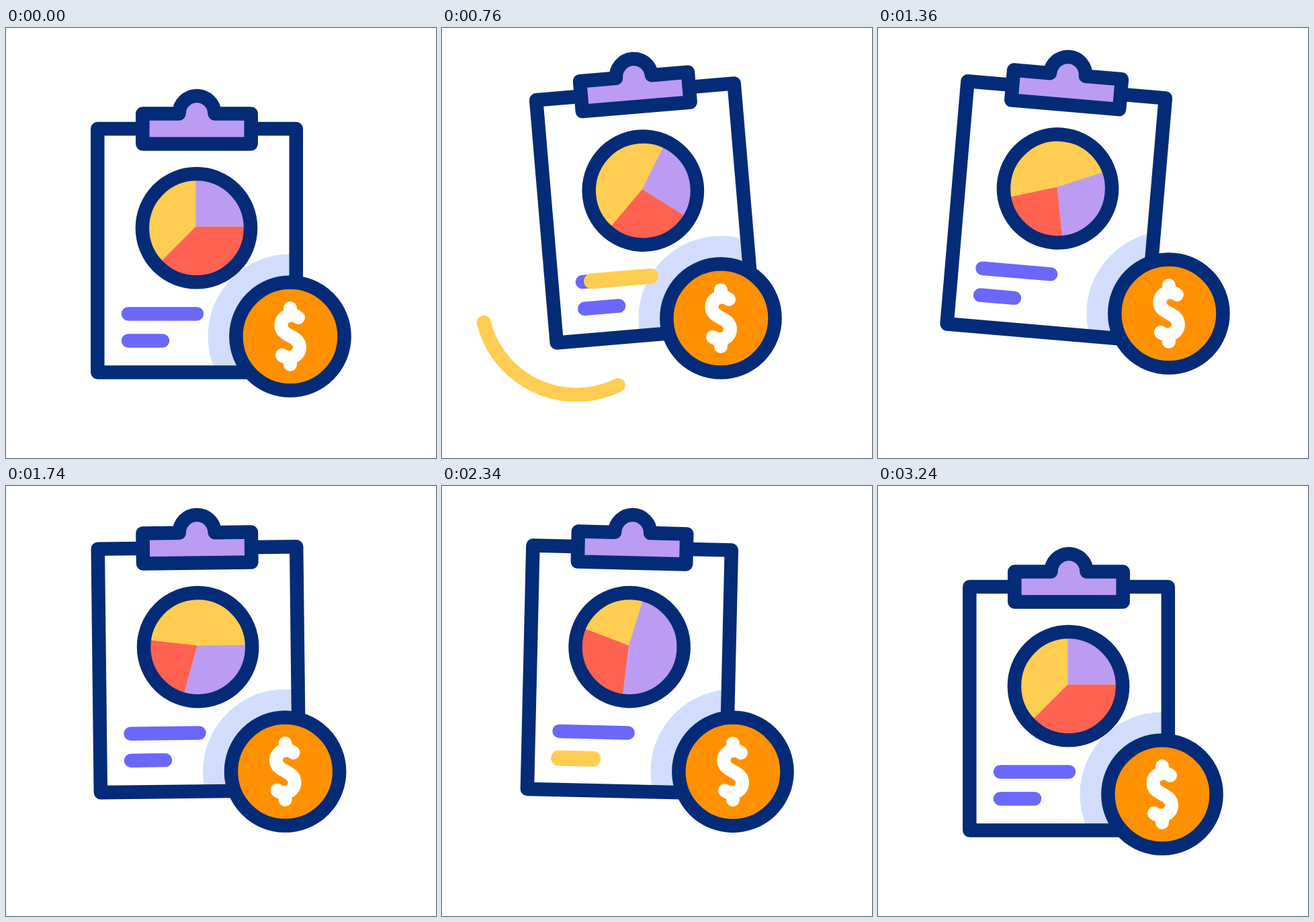
Write an HTML page with a canvas that moves like this. It is 640 px wide and 640 px high and loops after 3.6 s.

```html
<!DOCTYPE html>
<html lang="en">
<head>
<meta charset="utf-8">
<title>Report and coin</title>
<style>
  html, body { margin: 0; width: 100%; height: 100%; overflow: hidden; background: #fff; }
  canvas { display: block; width: 100vmin; height: 100vmin; }
</style>
</head>
<body>
<canvas id="stage" width="640" height="640"></canvas>
<script>
const ctx = document.getElementById('stage').getContext('2d');
const LOOP = 3600, LINE = 20.5, PIVOT = { x: 284, y: 110 };
const NAVY = '#032b78', PURPLE = '#bc9bf3', RED = '#ff6251', YELLOW = '#ffcd52';
const BAR = '#6b67fb', SHADE = '#d2ddfe', ORANGE = '#ff9100', WHITE = '#fff';

const linear = p => p;
const smooth = p => (1 - Math.cos(Math.PI * p)) / 2;
const rad = deg => deg * Math.PI / 180;

// Keys are [time, value] pairs.
function track(keys, ease = smooth) {
  return t => {
    if (t <= keys[0][0]) return keys[0][1];
    for (let i = 1; i < keys.length; i++) {
      const [t0, v0] = keys[i - 1], [t1, v1] = keys[i];
      if (t < t1) return v0 + (v1 - v0) * ease((t - t0) / (t1 - t0));
    }
    return keys[keys.length - 1][1];
  };
}

const boardTilt = track([[240, 0], [830, -5], [1400, 5], [2030, -5], [2560, 5], [3110, 0]]);
const boardLift = track([[240, 0], [850, -58], [2530, -58], [3090, 0]]);
const coinX = track([[363, 0], [926, -10], [1385, 10], [1850, -10], [2320, 10], [2790, 0]]);
const coinY = track([[363, 0], [930, -34], [2318, -34], [2888, 0]]);

// Clockwise slice borders, in degrees from the top.
const purpleFrom = track([[240, 0], [1740, 90], [2550, -10], [3240, 0]], linear);
const redFrom = track([[240, 90], [1740, 196], [2550, 182], [3240, 90]], linear);
const yellowFrom = track([[915, 225], [1740, 277], [2550, 294], [3240, 225]], linear);

const sweep = (h0, h1, t0, t1) => ({
  head: track([[h0, 0], [h1, 1]]),
  tail: track([[t0, 0], [t1, 1]])
});
const swoosh = sweep(420, 760, 770, 1100);
const longGlint = sweep(400, 700, 680, 1020);
const shortGlint = sweep(2040, 2310, 2360, 2640);

function stroke(color, width = LINE) {
  ctx.strokeStyle = color;
  ctx.lineWidth = width;
  ctx.stroke();
}

function fill(color) {
  ctx.fillStyle = color;
  ctx.fill();
}

function disc(x, y, r) {
  ctx.beginPath();
  ctx.arc(x, y, r, 0, 2 * Math.PI);
}

function bar(x0, x1, y, color, width) {
  ctx.beginPath();
  ctx.moveTo(x0, y);
  ctx.lineTo(x1, y);
  stroke(color, width);
}

function glint(x0, x1, y, part, t) {
  const a = part.tail(t), b = part.head(t);
  if (b > a) bar(x0 + (x1 - x0) * a, x0 + (x1 - x0) * b, y, YELLOW, 23);
}

function slice(from, to, color) {
  ctx.beginPath();
  ctx.moveTo(282.5, 295.5);
  ctx.arc(282.5, 295.5, 90, rad(from - 90), rad(to - 90));
  ctx.closePath();
  fill(color);
}

function drawPie(t) {
  const a = purpleFrom(t), b = redFrom(t), c = yellowFrom(t);
  ctx.save();
  disc(283.5, 297.7, 80.6);
  ctx.clip();
  ctx.fillStyle = YELLOW;
  ctx.fillRect(190, 200, 190, 190);
  slice(b, c, RED);
  slice(a, b, PURPLE);
  ctx.restore();
  disc(283.5, 297.7, 80.6);
  stroke(NAVY);
}

function drawClip() {
  ctx.beginPath();
  ctx.moveTo(203.3, 127.5);
  ctx.lineTo(257.5, 127.5);
  ctx.arc(284, 127.5, 26.5, Math.PI, 0);
  ctx.lineTo(364.7, 127.5);
  ctx.lineTo(364.7, 172.5);
  ctx.lineTo(203.3, 172.5);
  ctx.closePath();
  fill(PURPLE);
  stroke(NAVY);
}

function enterBoard(t) {
  ctx.translate(PIVOT.x, PIVOT.y + boardLift(t));
  ctx.rotate(rad(boardTilt(t)));
  ctx.translate(-PIVOT.x, -PIVOT.y);
}

function boardPath() {
  ctx.beginPath();
  ctx.rect(136.3, 150, 295.5, 362.5);
}

function drawBoard(t, cx, cy) {
  ctx.save();
  ctx.save();
  enterBoard(t);
  boardPath();
  fill(WHITE);
  ctx.clip();
  ctx.setTransform(1, 0, 0, 1, 0, 0);
  disc(cx, cy, 122.5);
  fill(SHADE);
  ctx.restore();

  enterBoard(t);
  boardPath();
  stroke(NAVY);
  drawClip();
  drawPie(t);
  bar(182, 284, 425.5, BAR);
  bar(182, 233, 465.5, BAR);
  glint(182, 284, 425.5, longGlint, t);
  glint(182, 233, 465.5, shortGlint, t);
  ctx.restore();
}

function drawCoin(cx, cy) {
  ctx.save();
  ctx.translate(cx - 423, cy - 459);
  disc(423, 459, 80.6);
  fill(ORANGE);
  stroke(NAVY);
  ctx.beginPath();
  ctx.moveTo(423, 417);
  ctx.lineTo(423, 428);
  ctx.moveTo(435, 431);
  ctx.bezierCurveTo(427, 424, 410, 427, 409.5, 442);
  ctx.bezierCurveTo(409, 460, 437, 457, 437, 475);
  ctx.bezierCurveTo(437, 490, 420, 494, 411, 487);
  ctx.moveTo(423, 490);
  ctx.lineTo(423, 501);
  stroke(WHITE, 20);
  ctx.restore();
}

function drawSwoosh(t) {
  const from = 166, to = 64;
  const a = swoosh.tail(t), b = swoosh.head(t);
  if (b <= a) return;
  ctx.beginPath();
  ctx.arc(200, 404, 142, rad(from + (to - from) * a), rad(from + (to - from) * b), true);
  stroke(YELLOW, 21);
}

function draw(now) {
  const t = now % LOOP;
  const cx = 423 + coinX(t), cy = 459 + coinY(t);
  ctx.fillStyle = WHITE;
  ctx.fillRect(0, 0, 640, 640);
  ctx.lineCap = ctx.lineJoin = 'round';
  drawSwoosh(t);
  drawBoard(t, cx, cy);
  drawCoin(cx, cy);
}

const start = performance.now();
function tick() {
  draw(performance.now() - start);
  requestAnimationFrame(tick);
}
tick();
</script>
</body>
</html>
```
